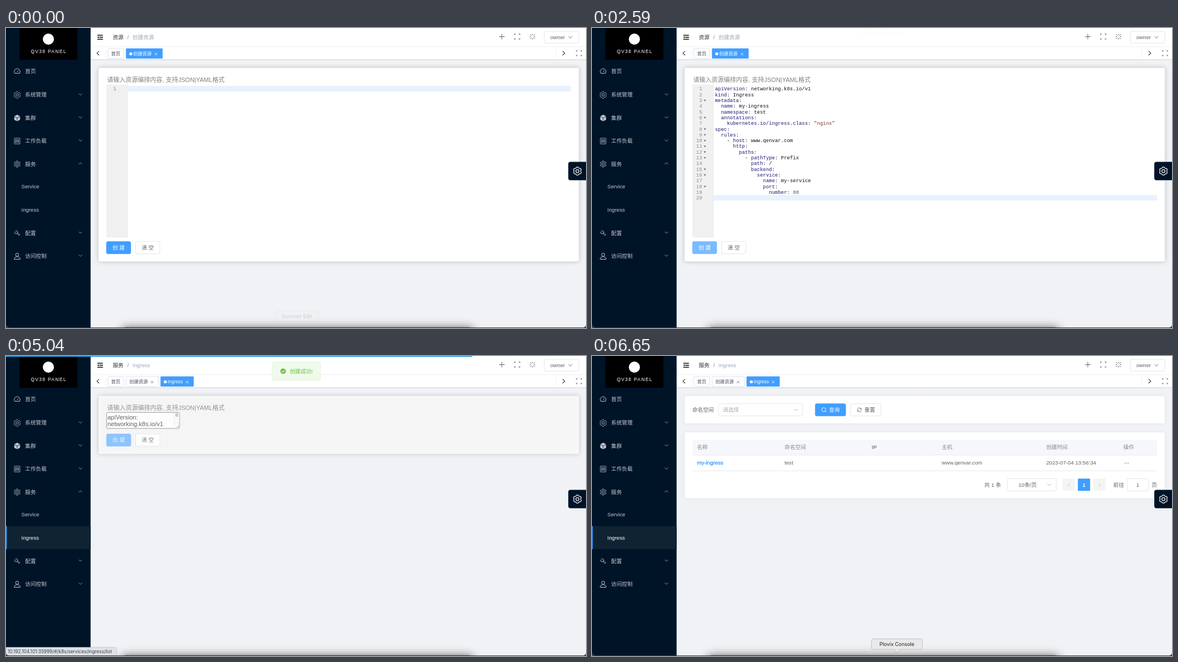
An HTML page with a canvas for the animation above (6.86 s loop, 1040 px wide and 539 px high).

```html
<!DOCTYPE html>
<html lang="zh-CN">
<head>
<meta charset="utf-8">
<style>
html, body { margin: 0; width: 100%; height: 100%; overflow: hidden; background: #2b2f36; }
canvas { display: block; width: 1040px; height: 539px; }
</style>
</head>
<body>
<canvas id="stage"></canvas>
<script>
const W = 1040, H = 539, LOOP = 6860, STEP = 70;
const canvas = document.getElementById('stage');
const dpr = window.devicePixelRatio || 1;
canvas.width = W * dpr;
canvas.height = H * dpr;
const ctx = canvas.getContext('2d');

const SANS = '"Liberation Sans", "Noto Sans CJK SC", "Noto Sans CJK", sans-serif';
const MONO = '"Liberation Mono", monospace';
const UI = 'Inter, sans-serif';
const NAVY = '#001428', BLUE = '#409eff', PALE = '#79bbff', TEXT = '#606266',
  LINE = '#dcdfe6', MENU = '#c3c8cf', GREEN = '#67c23a', HOVER = '#102332';
const BASE = 9.65, SMALL = 8.27, CODE = 8.96, ROW = 10.316;

const YAML = `apiVersion: networking.k8s.io/v1
kind: Ingress
metadata:
  name: my-ingress
  namespace: test
  annotations:
    kubernetes.io/ingress.class: "nginx"
spec:
  rules:
    - host: www.qenvar.com
      http:
        paths:
          - pathType: Prefix
            path: /
            backend:
              service:
                name: my-service
                port:
                  number: 80
`.split('\n');

const clamp = v => Math.max(0, Math.min(1, v));
const ramp = (t, a, b) => clamp((t - a) / (b - a));
const ease = p => p * p * (3 - 2 * p);
const mix = (a, b, p) => {
  const ch = (s, i) => parseInt(s.slice(i, i + 2), 16);
  return 'rgb(' + [1, 3, 5].map(i => Math.round(ch(a, i) + (ch(b, i) - ch(a, i)) * p)).join() + ')';
};

// y is the optical middle of the line
function text(s, x, y, color = TEXT, size = BASE, o = {}) {
  ctx.font = `${o.weight || 400} ${size}px ${o.font || SANS}`;
  ctx.textAlign = o.align || 'left';
  ctx.fillStyle = color;
  ctx.fillText(s, x, y + size * 0.36);
}
function box(x, y, w, h, fill, r = 0, border) {
  ctx.beginPath();
  ctx.roundRect(x, y, w, h, r);
  if (fill) { ctx.fillStyle = fill; ctx.fill(); }
  if (border) { ctx.strokeStyle = border; ctx.lineWidth = 0.8; ctx.stroke(); }
}
function line(color, width, ...paths) {
  ctx.strokeStyle = color;
  ctx.lineWidth = width;
  ctx.beginPath();
  for (const p of paths)
    for (let i = 0; i < p.length; i += 2) ctx[i ? 'lineTo' : 'moveTo'](p[i], p[i + 1]);
  ctx.stroke();
}
function circle(x, y, r, fill, stroke, width = 0.9) {
  ctx.beginPath();
  ctx.arc(x, y, r, 0, 7);
  if (fill) { ctx.fillStyle = fill; ctx.fill(); }
  if (stroke) { ctx.strokeStyle = stroke; ctx.lineWidth = width; ctx.stroke(); }
}
function faded(alpha, dx, dy, draw) {
  if (alpha <= 0) return;
  ctx.save();
  ctx.globalAlpha *= alpha;
  ctx.translate(dx, dy);
  draw();
  ctx.restore();
}
function chevron(x, y, dir, color, s = 3, width = 0.9) {
  const d = s / 2;
  const shapes = {
    down: [x - s, y - d, x, y + d, x + s, y - d],
    up: [x - s, y + d, x, y - d, x + s, y + d],
    left: [x + d, y - s, x - d, y, x + d, y + s],
    right: [x - d, y - s, x + d, y, x - d, y + s]
  };
  line(color, width, shapes[dir]);
}
function cross(x, y, color) {
  line(color, 0.8, [x - 2.2, y - 2.2, x + 2.2, y + 2.2], [x - 2.2, y + 2.2, x + 2.2, y - 2.2]);
}
function corners(x, y, s, color) {
  const k = s * 0.45, paths = [];
  for (const a of [-1, 1]) for (const b of [-1, 1])
    paths.push([x + a * (s - k), y + b * s, x + a * s, y + b * s, x + a * s, y + b * (s - k)]);
  line(color, 1, ...paths);
}
function gear(x, y, r, depth, color, width) {
  ctx.beginPath();
  for (let i = 0; i <= 72; i++) {
    const a = i / 72 * Math.PI * 2;
    const q = r * (1 - depth + depth * Math.tanh(2 * Math.cos(6 * a + Math.PI)));
    ctx.lineTo(x + q * Math.cos(a), y + q * Math.sin(a));
  }
  ctx.strokeStyle = color;
  ctx.lineWidth = width;
  ctx.stroke();
  circle(x, y, r * 0.38, null, color, width);
}

const icons = {
  gauge(x, y) {
    ctx.beginPath();
    ctx.arc(x, y, 5.2, 2.5, 0.64);
    ctx.closePath();
    ctx.strokeStyle = MENU;
    ctx.lineWidth = 1;
    ctx.stroke();
    line(MENU, 1, [x, y + 1, x + 2, y - 2]);
  },
  gear(x, y) { gear(x, y, 6, 0.09, MENU, 0.9); },
  cube(x, y) {
    ctx.beginPath();
    for (let i = 0; i < 6; i++) ctx.lineTo(x + 6 * Math.sin(i * Math.PI / 3), y - 6 * Math.cos(i * Math.PI / 3));
    ctx.fillStyle = MENU;
    ctx.fill();
    line(NAVY, 0.8, [x - 5, y - 2.6, x, y, x + 5, y - 2.6], [x, y, x, y + 6]);
  },
  sliders(x, y) {
    box(x - 5, y - 5.2, 10, 10.4, null, 0.5, MENU);
    line(MENU, 0.9, ...[-2.5, 0, 2.5].map(d => [x + d, y - 3.4, x + d, y + 3.4]));
    line(MENU, 1, [x - 3.4, y + 1, x - 1.6, y + 1], [x - 0.9, y - 1.2, x + 0.9, y - 1.2], [x + 1.6, y + 1, x + 3.4, y + 1]);
  },
  atom(x, y) { gear(x, y, 5.8, 0.17, MENU, 0.9); },
  wrench(x, y) {
    circle(x - 1.8, y - 1.6, 2.7, null, MENU);
    line(MENU, 0.9, [x - 0.3, y + 0.7, x + 3.4, y + 4.4, x + 4.8, y + 3, x + 1, y - 0.8]);
    line(NAVY, 1.8, [x - 5, y - 4.8, x - 2.2, y - 2]);
  },
  user(x, y) {
    circle(x, y - 2.6, 2.8, null, MENU, 1);
    ctx.beginPath();
    ctx.moveTo(x - 5.4, y + 5.5);
    ctx.bezierCurveTo(x - 5.4, y - 0.8, x + 5.4, y - 0.8, x + 5.4, y + 5.5);
    ctx.closePath();
    ctx.stroke();
  }
};
const menu = [
  ['首页', 'gauge', 78], ['系统管理', 'gear', 120, 'down'], ['集群', 'cube', 161.4, 'down'],
  ['工作负载', 'sliders', 202.8, 'down'], ['服务', 'atom', 244.2, 'up'],
  ['配置', 'wrench', 368.3, 'down'], ['访问控制', 'user', 409.7, 'down']
];

function sidebar(t) {
  box(0, 0, 151.7, H, NAVY);
  box(24, 0, 104, 57, '#000');
  circle(76, 20, 10, '#fff');
  ctx.letterSpacing = '1.3px';
  text('QV38 PANEL', 76.6, 42.4, '#fff', 8.5, { align: 'center' });
  ctx.letterSpacing = '0px';

  const active = t >= 5040;
  const hover = t >= 4690 ? 1 : t >= 4480 ? 0.25 : 0;
  faded(hover, 0, 0, () => box(0, 305.5, 151.7, 41.4, HOVER));
  if (t >= 5390) faded(1 - ramp(t, 5460, 5670), 0, 0, () => box(0, 264, 151.7, 41.4, HOVER));
  if (active) box(0, 305.5, 1.4, 41.4, BLUE);
  for (const [label, icon, y, dir] of menu) {
    icons[icon](20, y + 0.3);
    text(label, 34.3, y, MENU);
    if (dir) chevron(133.5, y - 0.8, dir, '#9ba5b0');
  }
  text('Service', 27.5, 285, MENU);
  text('Ingress', 27.5, 326.3, active ? '#fff' : MENU);
}

function tab(x, w, label, on, closable) {
  const y = 46, color = on ? '#fff' : '#495060';
  box(x + 0.4, 37, w - 0.8, 17.4, on ? BLUE : '#fff', 0.5, on ? BLUE : '#d8dce5');
  if (on) circle(x + 8.7, y + 0.4, 2.7, '#fff');
  text(label, x + (on ? 13 : 6.3), y + 0.3, color, SMALL);
  if (closable) cross(x + w - 11.7, y + 0.9, on ? '#fff' : '#6b717c');
}

function header(t) {
  const ink = '#303133', moved = t >= 5040;
  box(151.7, 0, W, 56.5, '#fff');
  line('#e9ebf0', 0.8, [151.7, 33.7, W, 33.7]);
  line('#d5d8de', 1, [151.7, 56.7, W, 56.7]);
  line('#e6e8ec', 1, [151.7, 57.7, W, 57.7]);
  line('#111', 1.6, [163.8, 13, 173.8, 13], [167.5, 16.6, 173.8, 16.6], [163.8, 20.2, 173.8, 20.2]);
  ctx.fillStyle = '#111';
  ctx.beginPath();
  ctx.moveTo(163.6, 16.6); ctx.lineTo(166.4, 14.7); ctx.lineTo(166.4, 18.5);
  ctx.fill();
  text(moved ? '服务' : '资源', 191.5, 16.6, ink);
  text('/', 217.6, 16.6, '#7c828c');
  text(moved ? 'Ingress' : '创建资源', 226.8, 16.6, '#97a8be');

  line(TEXT, 1, [884, 15.5, 894, 15.5], [889, 10.5, 889, 20.5]);
  corners(916.6, 15.4, 4.8, TEXT);
  const rays = [];
  for (let i = 0; i < 8; i++) {
    const c = Math.cos(i * Math.PI / 4), s = Math.sin(i * Math.PI / 4), far = i % 2 ? 6 : 5;
    rays.push([944 + c * 2.6, 15.5 + s * 2.6, 944 + c * far, 15.5 + s * far]);
  }
  line(TEXT, 1, ...rays);
  box(965.2, 6, 62, 21.2, '#fff', 2.8, LINE);
  text('owner', 976, 16.6);
  chevron(1011.8, 16.6, 'down', TEXT, 3.2);

  chevron(165, 45.2, 'left', ink, 3.8, 1.1);
  chevron(1000, 45.2, 'right', ink, 3.8, 1.1);
  line('#eceef2', 0.8, [179.4, 38, 179.4, 53], [985.5, 38, 985.5, 53]);
  corners(1027.5, 45.3, 4.6, TEXT);
  tab(182.3, 29, '首页');
  if (moved) {
    tab(215, 58.6, '创建资源', false, true);
    tab(277, 59.6, 'Ingress', true, true);
  } else tab(215, 65.8, '创建资源', true, true);
}

function card(y, h, shadow) {
  ctx.save();
  ctx.shadowColor = `rgba(0,0,0,${shadow})`;
  ctx.shadowBlur = 8 * dpr;
  box(165.8, y, 861.5, h, '#fff', 2.5);
  ctx.restore();
  box(165.8, y, 861.5, h, null, 2.5, '#e4e7ed');
}
function button(x, y, w, label, fill) {
  box(x + 0.3, y - 11, w - 0.6, 22, fill || '#fff', 2.6, fill || LINE);
  text(label, x + w / 2, y, fill ? '#fff' : TEXT, BASE, { align: 'center', weight: 500 });
}

function createColor(t) {
  if (t < 2240) return mix(BLUE, PALE, ramp(t, 1900, 2080));
  if (t < 2450) return mix(PALE, '#337ecc', ramp(t, 2170, 2310));
  return mix('#337ecc', PALE, ramp(t, 2380, 2520));
}
function formActions(t, y) {
  button(179.8, y, 44.2, '创 建', createColor(t));
  button(232, y, 44.2, '清 空');
}

function editor(t) {
  const full = t >= 1190, rows = full ? YAML : [''];
  const mono = { font: MONO };
  box(180, 101.8, 37.6, 274.7, '#f0f0f0');
  line('#dedede', 0.6, [217.4, 101.8, 217.4, 376.5]);
  const top = 104 + (rows.length - 1) * ROW;
  box(218, top, 795.3, 10, '#e8f2fe');
  const indent = s => s.search(/\S/);
  rows.forEach((row, i) => {
    const y = 109.1 + i * ROW;
    text(i + 1, 197.6, y, '#8c8c8c', CODE, { font: MONO, align: 'right' });
    const m = row.match(/^(\s*(?:- )?)([\w.\/]+:)(.*)$/);
    if (!m) return;
    const step = CODE * 0.6, kx = 220.5 + m[1].length * step;
    const color = /"/.test(m[3]) ? '#7a3434' : /^ \d/.test(m[3]) ? '#43546e' : '#111';
    text(m[1], 220.5, y, '#111', CODE, mono);
    text(m[2], kx, y, '#1c1a70', CODE, mono);
    text(m[3], kx + m[2].length * step, y, color, CODE, mono);
    if (indent(rows[i + 1]) > indent(row)) {
      ctx.fillStyle = '#6e6e6e';
      ctx.beginPath();
      ctx.moveTo(200.4, y - 1); ctx.lineTo(204.4, y - 1); ctx.lineTo(202.4, y + 2.2);
      ctx.fill();
    }
  });
  if ((t >= 280 && t < 840) || (t >= 1190 && t < 1750)) box(220.4, top - 0.5, 1.2, 11, '#000');
}

function formPage(t) {
  const small = t >= 5040;
  card(71.5, small ? 104.5 : 348, 0.22);
  text('请输入资源编排内容, 支持JSON|YAML格式', 181.2, 93.2, '#808080', 11.03);
  if (!small) {
    editor(t);
    formActions(t, 394.7);
    return;
  }
  box(180.3, 101.3, 130.6, 28.8, '#fff', 1.5, '#6c6c6c');
  text('apiVersion:', 181.8, 109.8, '#444', 11.03);
  text('networking.k8s.io/v1', 181.8, 122.3, '#444', 11.03);
  box(301.2, 102, 9.2, 27.4, '#fafafa');
  line('#e4e4e4', 0.7, [301, 102, 301, 129.6], [301, 119.5, 310.5, 119.5]);
  box(303.2, 102.6, 5.6, 6.6, '#c1c1c1', 2.8);
  line('#777', 0.7, [305.5, 129, 309.8, 124.7], [308, 129, 309.8, 127.2]);
  formActions(t, 151);
}

const columns = [
  [188.2, '名称', 'my-ingress'], [345.3, '命名空间', 'test'], [501.5, 'IP', ''],
  [627, '主机', 'www.qenvar.com'], [814.5, '创建时间', '2023-07-04 13:56:34'], [952.7, '操作', '']
];
function listPage(t) {
  card(71.5, 50, 0.04);
  text('命名空间', 180, 97);
  box(226.8, 85.6, 151, 22, '#fff', 2.6, LINE);
  text('请选择', 234.5, 97, '#a8abb2');
  chevron(365.6, 96.8, 'down', '#a8abb2', 3.4);
  button(400, 96.7, 55.2, '', BLUE);
  circle(415.6, 96.4, 3.6, null, '#fff');
  line('#fff', 0.9, [418.2, 99, 420.2, 101]);
  text('查询', 425, 96.8, '#fff', BASE, { weight: 500 });
  button(463.4, 96.7, 55.2, '');
  ctx.strokeStyle = TEXT;
  ctx.lineWidth = 0.9;
  for (const a of [0.25, Math.PI + 0.25]) {
    ctx.beginPath();
    ctx.arc(479.4, 96.8, 3.5, a, a + 2.5);
    ctx.stroke();
  }
  line(TEXT, 0.9, [476, 99.9, 476, 97.6, 478.2, 97.6], [482.8, 93.7, 482.8, 96, 480.6, 96]);
  text('重置', 488.4, 96.8, TEXT, BASE, { weight: 500 });

  card(136.7, 119.3, 0.04);
  box(180, 150.4, 833.3, 27.6, '#f5f7fa');
  line('#e6e9f0', 0.8, [180, 178.2, 1013.3, 178.2]);
  columns.forEach(([x, head, cell], i) => {
    text(head, x, 163.8, '#85888e', BASE, { weight: head === 'IP' ? 700 : 500 });
    if (t < 5390 || !cell) return;
    text(cell, x, 192, i ? TEXT : BLUE);
    if (!i) {
      ctx.strokeStyle = BLUE;
      ctx.lineWidth = 0.35;
      ctx.strokeText(cell, x, 192 + BASE * 0.36);
    }
  });
  if (t >= 5390) {
    for (const x of [955.8, 958.7, 961.6]) circle(x, 192.5, 0.8, '#777a80');
    line('#dfe3ea', 0.8, [180, 206.3, 1013.3, 206.3]);
  }

  const y = 231.3;
  text('共 1 条', 703.6, y);
  box(744.6, y - 11, 87.8, 22, '#fff', 2.6, LINE);
  text('10条/页', 781, y, TEXT, BASE, { align: 'center' });
  chevron(820, y - 0.2, 'down', '#a8abb2', 3.2);
  box(843.8, y - 11, 22, 22, '#f4f4f5', 1.4);
  chevron(854.6, y, 'left', '#b4b7bd', 2.8);
  box(871.2, y - 11, 22, 22, BLUE, 1.4);
  text('1', 882.2, y, '#fff', BASE, { align: 'center', weight: 700 });
  box(899, y - 11, 22, 22, '#f4f4f5', 1.4);
  chevron(910, y, 'right', '#b4b7bd', 2.8);
  text('前往', 934.8, y);
  box(959.7, y - 11, 38, 22, '#fff', 2.6, LINE);
  text('1', 978.7, y, TEXT, BASE, { align: 'center' });
  text('页', 1003.6, y);
}

function message(t) {
  const shown = ease(ramp(t, 2520, 2870)) * (1 - ease(ramp(t, 5700, 6010)));
  faded(shown, 0, -34 * (1 - shown), () => {
    box(477.3, 10.8, 86.6, 33, '#f0f9eb', 2.6, '#e1f3d8');
    circle(496.9, 27.3, 4.9, GREEN);
    line('#fff', 1.1, [494.4, 27.4, 496.2, 29.2, 499.5, 25.7]);
    text('创建成功!', 509, 27.3, GREEN);
  });
}

function statusBar(t) {
  const target = t < 5390 ? 'ingress' : 'service';
  const alpha = (t < 4690 ? 0 : 0.55 + 0.45 * ramp(t, 4690, 4900)) * (1 - ramp(t, 5530, 5810));
  faded(alpha, 0, 0, () => {
    box(-2, 523.4, 200.8, 18, '#dee1e6', 2.5, '#c3c7cd');
    text(`10.192.104.101:35999/#/k8s/services/${target}/list`, 3, 530.8, '#3c4043', SMALL, { font: UI });
  });
}

function dockLabel(label, x, w, alpha) {
  faded(alpha, 0, 0, () => {
    box(x - w / 2, 508.2, w, 19, '#e9e9ea', 3, '#b2b3b5');
    ctx.fillStyle = '#e9e9ea';
    ctx.beginPath();
    ctx.moveTo(x - 5.5, 526.8); ctx.lineTo(x, 532.6); ctx.lineTo(x + 5.5, 526.8);
    ctx.fill();
    line('#b2b3b5', 0.8, [x - 5.5, 527.2, x, 532.6, x + 5.5, 527.2]);
    text(label, x, 517.6, '#222', CODE, { font: UI, align: 'center' });
  });
}

function dockShadow() {
  ctx.save();
  ctx.shadowColor = 'rgba(0,0,0,0.5)';
  ctx.shadowBlur = 16 * dpr;
  box(205, 537, 635, 30, '#8a8c90', 12);
  ctx.restore();
}

function render(t) {
  ctx.setTransform(dpr, 0, 0, dpr, 0, 0);
  box(0, 0, W, H, '#3a3d42');
  ctx.save();
  ctx.beginPath();
  ctx.roundRect(0, -10, W, 548, 5);
  ctx.clip();
  box(0, 0, W, H, '#f0f2f5');

  const leave = ramp(t, 5005, 5215), enter = ramp(t, 5145, 5250);
  if (t < 5180) faded(t < 5040 ? 1 : 1 - leave, 30 * ease(leave) ** 2, 0, () => formPage(t));
  else faded(enter, -30 * (1 - enter), 0, () => listPage(t));

  header(t);
  sidebar(t);
  box(1008.2, 240.5, 40, 33, NAVY, 4);
  gear(1024.6, 257.1, 7.4, 0.09, '#fff', 1.2);
  if (t >= 5040) faded(1 - ramp(t, 5110, 5250), 0, 0, () =>
    box(0, 0, 836 + 191 * ramp(t, 5040, 5180), 1.4, '#2299dd'));
  message(t);
  dockShadow();
  statusBar(t);
  if (t < 280) dockLabel('Quorvex Edit', 521.5, 77, t < STEP ? 0.16 : 0.06);
  if (t >= 6650) dockLabel('Plovix Console', 546.8, 91, 1);
  ctx.restore();
}

const start = performance.now();
function tick() {
  const t = (performance.now() - start) % LOOP;
  render(Math.floor(t / STEP) * STEP);
  requestAnimationFrame(tick);
}
tick();
</script>
</body>
</html>
```
